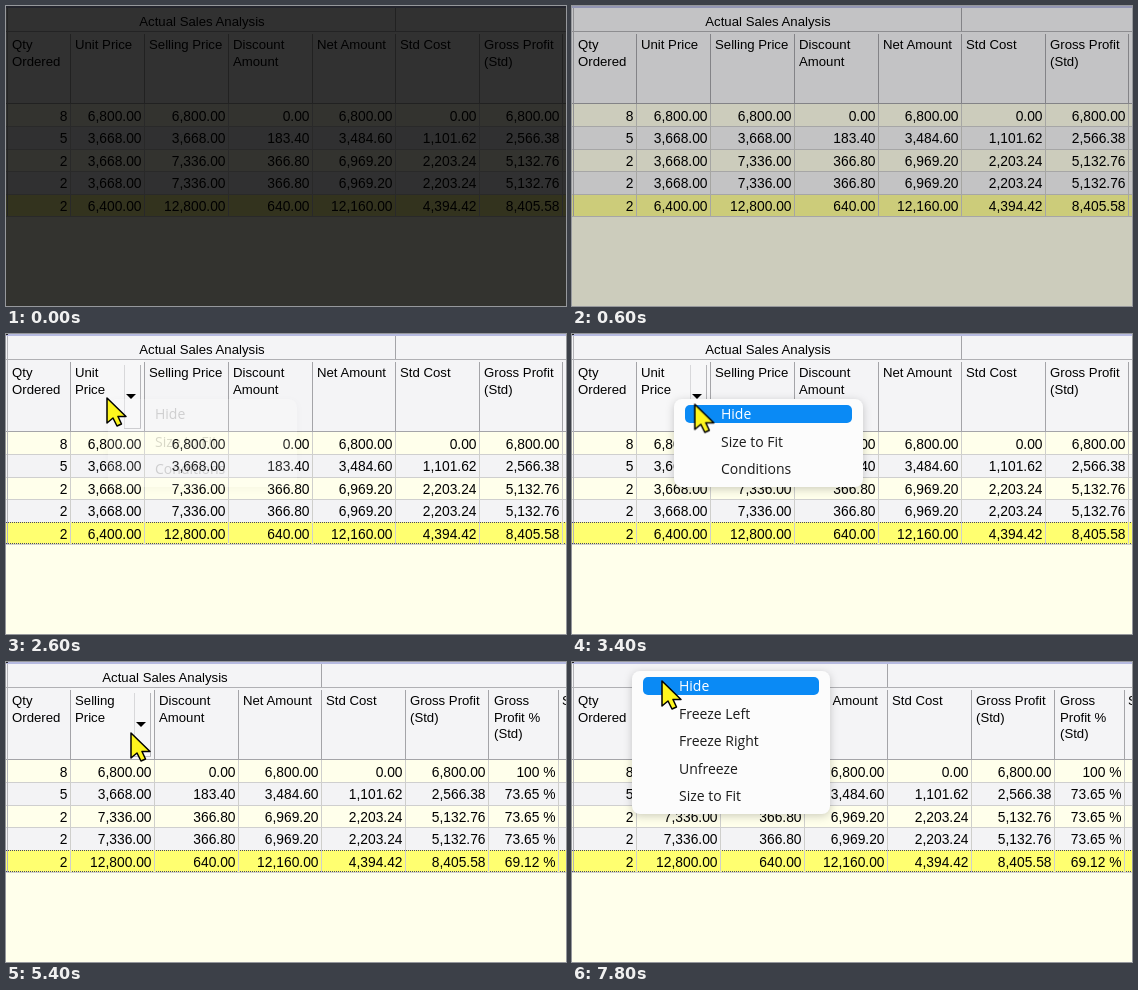
These frames come from a looping animation (560x300 px, 8000 ms). An HTML page:

```html
<!DOCTYPE html>
<html lang="en">
<head>
<meta charset="utf-8">
<title>Hiding a grid column</title>
<style>
html, body { margin: 0; width: 100%; height: 100%; overflow: hidden; background: #ffffeb; }
svg { display: block; width: 560px; height: 300px; }
text { font: 13.2px "Liberation Sans", Arial, sans-serif; fill: #000; }
.num { font-size: 13.8px; text-anchor: end; }
.mid { text-anchor: middle; }
.menu text { font: 500 14px "Open Sans", "Noto Sans", sans-serif; fill: #1a1a1a; }
.menu .lit text { fill: #fff; }
.menu { filter: drop-shadow(0 2px 4px #0003); }

#veil, #cursor, #unit, #rest, #title, #focus, #hoverUnit, #hoverSell,
#menu1, #menu2, #menu1 .lit, #menu2 .lit { animation: 8s linear infinite; }
#unit, #rest, #title, #focus, #hoverUnit, #hoverSell, .menu .lit { animation-timing-function: step-end !important; }

#veil { animation-name: veil; }
@keyframes veil { 0% { opacity: .8 } 10%, 100% { opacity: 0 } }

#cursor { animation-name: cursor; }
@keyframes cursor {
  0%, 15% { transform: translate(80px, 310px) }
  17.5% { transform: translate(84px, 234px) }
  20% { transform: translate(97px, 78px); animation-timing-function: ease-out }
  27.5%, 37% { transform: translate(101px, 64px); animation-timing-function: ease-in-out }
  44%, 70% { transform: translate(125px, 71px); animation-timing-function: ease-in-out }
  77.5%, 90% { transform: translate(61px, 8px); animation-timing-function: ease-in-out }
  97%, 100% { transform: translate(90px, 19px) }
}

#unit { animation-name: unit; }
@keyframes unit { 0% { opacity: 1 } 60%, 100% { opacity: 0 } }
#rest { animation-name: rest; }
@keyframes rest { 0% { transform: none } 60%, 100% { transform: translateX(-74px) } }
#title { animation-name: title; }
@keyframes title { 0% { transform: none } 60%, 100% { transform: translateX(-37px) } }
#focus { animation-name: focus; }
@keyframes focus { 0% { opacity: 0 } 32%, 100% { opacity: 1 } }
#hoverUnit { animation-name: hoverUnit; }
@keyframes hoverUnit { 0% { opacity: 0 } 19.5% { opacity: 1 } 60%, 100% { opacity: 0 } }
#hoverSell { animation-name: hoverSell; }
@keyframes hoverSell { 0% { opacity: 0 } 60% { opacity: 1 } 74%, 100% { opacity: 0 } }

#menu1 { animation-name: menu1; }
@keyframes menu1 {
  0%, 32% { opacity: 0; clip-path: inset(-10px) }
  35%, 57.39% { opacity: 1; clip-path: inset(-10px) }
  57.4%, 58.5% { opacity: 1; clip-path: inset(0 3px 56px 3px) }
  60%, 100% { opacity: 0; clip-path: inset(0 3px 56px 3px) }
}
#menu1 .lit { animation-name: lit1; }
@keyframes lit1 { 0% { opacity: 0 } 40%, 100% { opacity: 1 } }
#menu2 { animation-name: menu2; }
@keyframes menu2 { 0%, 87% { opacity: 0 } 90%, 100% { opacity: 1 } }
#menu2 .lit { animation-name: lit2; }
@keyframes lit2 { 0% { opacity: 0 } 94.5%, 100% { opacity: 1 } }
</style>
</head>
<body>
<svg id="stage" viewBox="0 0 560 300"></svg>
<script>
const TOP = 98, PITCH = 22.5, HEAD = 26;

const rect = (x, y, w, h, fill, more = '') =>
  `<rect x="${x}" y="${y}" width="${w}" height="${h}" fill="${fill}" ${more}/>`;
const line = (x1, y1, x2, y2, color, more = '') =>
  `<path d="M${x1} ${y1}L${x2} ${y2}" stroke="${color}" ${more}/>`;
const text = (x, y, s, cls = '') => `<text x="${x}" y="${y}" class="${cls}">${s}</text>`;
const group = (id, body, more = '') => `<g id="${id}" ${more}>${body}</g>`;
const rowY = i => Math.floor(TOP + i * PITCH);

const heading = (x, label) =>
  label.split('|').map((s, i) => text(x + 5, 43 + 16.5 * i, s)).join('');

function column(left, right, label, values) {
  const cells = values.split(' ').map((v, i) =>
    text(right - 2.5, TOP + i * PITCH + 16.5, v.replace('%', ' %'), 'num')).join('');
  return heading(left, label) + cells +
    line(right + .5, HEAD + 2, right + .5, 97, '#a4a4a8') +
    line(right + .5, TOP, right + .5, 210, '#cfcfcc');
}

// Hovered header: wrapped label and a drop-down button
function hover(id, left, right, label) {
  const b = right - 20;
  return group(id,
    rect(left + 1, HEAD, right - left - 1, 71, '#f7f7f8') + heading(left, label) +
    line(b + .5, 31, b + .5, 95, '#d8d8da') +
    line(right - 3.5, 31, right - 3.5, 95, '#b4b4b8') +
    line(b, 94.5, right - 3, 94.5, '#c4c4c8') +
    `<path d="M${right - 18} 60h10l-5 5z" fill="#000"/>`);
}

function menu(id, x, y, w, items) {
  const rows = items.map((s, i) => text(x + 47, y + 20 + 27.5 * i, s)).join('');
  const lit = rect(x + 11, y + 6, w - 22, 18, '#0a8af5', 'rx="5"') + text(x + 47, y + 20, items[0]);
  return group(id, rect(x, y, w, 33 + 27.5 * (items.length - 1), '#fcfcfc', 'rx="8"') +
    rows + `<g class="lit">${lit}</g>`, 'class="menu"');
}

const stripes = ['#ffffeb', '#f3f3f5', '#ffffeb', '#f3f3f5', '#ffff98'].map((c, i) =>
  rect(0, rowY(i), 560, rowY(i + 1) - rowY(i), c)).join('');
const rules = [1, 2, 3, 4, 5].map(i =>
  line(0, rowY(i) + .5, 560, rowY(i) + .5, '#cfcfcf')).join('');
const dots = y => line(0, y, 560, y, '#44446a', 'stroke-dasharray="1 1"');

document.getElementById('stage').innerHTML =
  rect(0, 0, 560, 300, '#ffffeb') +
  rect(0, 0, 560, 97, '#f4f4f6') +
  rect(0, 0, 560, 2, '#b6bae0') +
  line(0, 25.5, 560, 25.5, '#b0b0b4') +
  line(0, 97.5, 560, 97.5, '#a4a4a8') +
  stripes + rules +
  group('focus', rect(0, 188, 560, 22, '#ffff70') + dots(188.5) + dots(209.5) + rect(0, 0, 2, 1, '#222')) +
  line(1.5, 2, 1.5, 210, '#b4b4b8') +
  column(1, 64, 'Qty|Ordered', '8 5 2 2 2') +
  group('title', text(196, 19.5, 'Actual Sales Analysis', 'mid')) +
  group('unit',
    column(64, 138, 'Unit Price', '6,800.00 3,668.00 3,668.00 3,668.00 6,400.00')) +
  hover('hoverUnit', 64, 138, 'Unit|Price') +
  group('rest',
    line(389.5, 2, 389.5, 25, '#a4a4a8') +
    column(138, 222, 'Selling Price', '6,800.00 3,668.00 7,336.00 7,336.00 12,800.00') +
    column(222, 306, 'Discount|Amount', '0.00 183.40 366.80 366.80 640.00') +
    column(306, 389, 'Net Amount', '6,800.00 3,484.60 6,969.20 6,969.20 12,160.00') +
    column(389, 473, 'Std Cost', '0.00 1,101.62 2,203.24 2,203.24 4,394.42') +
    column(473, 556, 'Gross Profit|(Std)', '6,800.00 2,566.38 5,132.76 5,132.76 8,405.58') +
    column(557, 626, 'Gross|Profit %|(Std)', '100% 73.65% 73.65% 73.65% 69.12%') +
    heading(625, 'S')) +
  hover('hoverSell', 64, 148, 'Selling|Price') +
  menu('menu1', 102, 65, 189, ['Hide', 'Size to Fit', 'Conditions']) +
  menu('menu2', 60, 9, 198, ['Hide', 'Freeze Left', 'Freeze Right', 'Unfreeze', 'Size to Fit']) +
  group('cursor', '<path d="M0 0V25L6 20L10 28L14.5 26L11 18.5H19Z" fill="#fdf51e" stroke="#000" stroke-width="1.5" stroke-linejoin="round"/>') +
  rect(0, 0, 560, 300, '#000', 'id="veil"');
</script>
</body>
</html>
```
